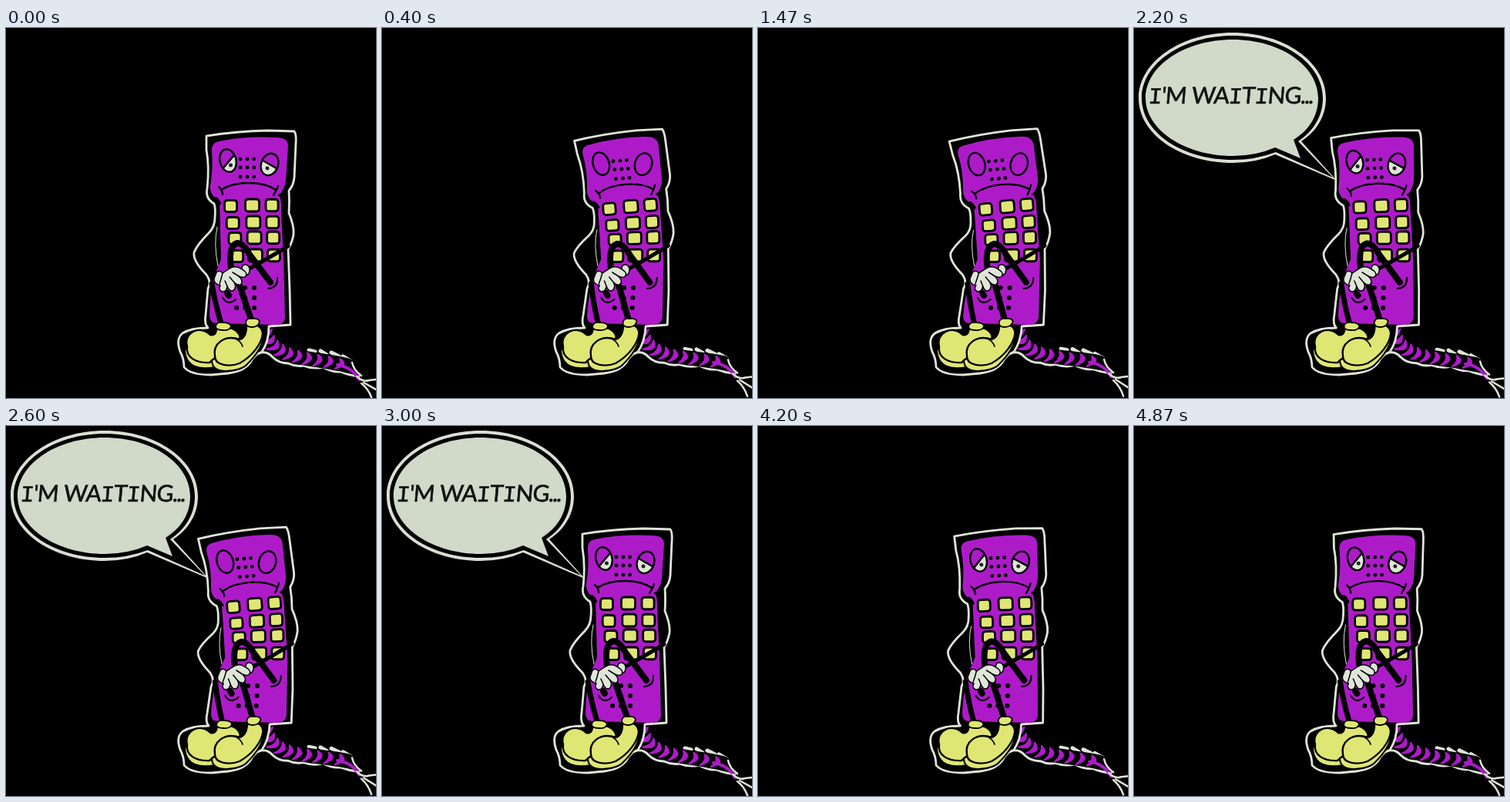
These frames come from a looping animation (480 by 480 pixels, 4.94 s). An HTML page:

```html
<!DOCTYPE html>
<html lang="en">
<head>
<meta charset="utf-8">
<title>I'm waiting</title>
<style>
  html, body { margin: 0; width: 100%; height: 100%; overflow: hidden; background: #000; }
  svg { display: block; width: 100%; height: 100%; }
  path { stroke-linecap: round; stroke-linejoin: round; }
  text { font: 30px Lato, sans-serif; letter-spacing: -1px; fill: #10120f; stroke: #10120f; stroke-width: .6; }
  .i { font-family: "Liberation Mono", monospace; }
  .dots { letter-spacing: -2px; }
</style>
</head>
<body>
<svg id="stage" viewBox="0 0 480 480">
  <defs>
    <clipPath id="clipL"><ellipse rx="10.5" ry="15" transform="rotate(-14)"/></clipPath>
    <clipPath id="clipR"><ellipse rx="11" ry="14.5" transform="rotate(20)"/></clipPath>
  </defs>
  <g id="bubble">
    <path fill="#d9e0d1" d="M217,147 C237,134 249,114 249,91 C249,44 195,6 128,6 C61,6 6,44 6,91 C6,138 61,175 128,175 Q158,175 183,164 L263,198 Z"/>
    <path fill="#000" d="M213,147 C234,133 245,113 245,91 C245,46 193,10 128,10 C63,10 10,46 10,91 C10,136 63,171 128,171 Q158,171 184,161 L258,194 Z"/>
    <path fill="#d1d9c9" d="M207,145 C228,132 239,113 239,91 C239,49 190,15 128,15 C66,15 15,49 15,91 C15,132 66,166 128,166 Q158,166 183,155 L216,169 Z"/>
    <g transform="translate(0 98) skewX(-5)">
      <text x="18"><tspan class="i">I</tspan>'M</text>
      <text x="74">WA<tspan class="i">I</tspan>T<tspan class="i">I</tspan>NG<tspan class="dots">...</tspan></text>
    </g>
  </g>
  <g id="phone"></g>
</svg>
<script>
const LOOP = 4940, SWAY = LOOP / 5;
const BUBBLE_ON = 1530, BUBBLE_OFF = 4000;
const PURPLE = '#ad1bc9', YELLOW = '#dfe674', WHITE = '#dfe6d8', BLACK = '#000';
const phone = document.getElementById('phone');
const bubble = document.getElementById('bubble');
const parts = [], eyes = [];

const clamp = v => Math.max(0, Math.min(1, v));
const smooth = v => { v = clamp(v); return v * v * (3 - 2 * v); };

function node(name, attrs, parent) {
  const el = document.createElementNS('http://www.w3.org/2000/svg', name);
  for (const key in attrs) el.setAttribute(key, attrs[key]);
  parent.appendChild(el);
  return el;
}

// Bends a point of the upright pose; k runs from 0 (right) to 1 (left).
function bend(x, y, k) {
  const u = clamp((402 - y) / 262);
  const dx = 22 * u - 6.6 * u * u - 27.4 * u ** 3;
  let dy = -(x - 338) * 0.092 * smooth((305 - y) / 70);
  if (y > 390 && x > 345) dy -= 4 * clamp((x - 345) / 100) * clamp((490 - y) / 30);
  return [x + k * dx, y + k * dy];
}

function shape(d, fill, stroke = 'none', width = 0) {
  parts.push({ d, el: node('path', { fill, stroke, 'stroke-width': width }, phone) });
}
const line = (d, stroke = BLACK, width = 2.5) => shape(d, 'none', stroke, width);
const dot = (x, y, r = 2.4) => line(`M${x},${y} L${x + 0.1},${y}`, BLACK, r * 2);

function key(x, y, w, h) {
  const l = x - w / 2, r = x + w / 2, t = y - h / 2, b = y + h / 2, c = 4;
  shape(`M${l + c},${t} L${r - c},${t} Q${r},${t} ${r},${t + c} L${r},${b - c} Q${r},${b} ${r - c},${b}` +
    ` L${l + c},${b} Q${l},${b} ${l},${b - c} L${l},${t + c} Q${l},${t} ${l + c},${t} Z`, YELLOW, BLACK, 2.8);
}

function cord() {
  const P = [[336, 391], [344, 432], [395, 426], [443, 438]];
  const at = (s, i) => (1 - s) ** 3 * P[0][i] + 3 * s * (1 - s) ** 2 * P[1][i] +
    3 * s * s * (1 - s) * P[2][i] + s ** 3 * P[3][i];
  line('M328,422 Q338,418 346,427 Q354,435 366,435 Q376,440 386,438 Q399,443 411,440 Q424,447 434,446 Q446,451 458,452', WHITE, 3);
  line('M393,418 L401,420 M408,419 L416,424 M422,421 L432,426 M437,426 L447,432', WHITE, 5);
  line('M336,391 C344,432 395,426 443,438', BLACK, 19);
  for (let n = 0; n < 10; n++) {
    const s = 0.03 + n * 0.1, x = at(s, 0), y = at(s, 1);
    const a = Math.atan2(at(s + .01, 1) - y, at(s + .01, 0) - x) - 0.15;
    const h = 9 - n * 0.25, c = Math.cos(a), q = Math.sin(a);
    const p = (t, v) => `${(x + c * t - q * v).toFixed(1)},${(y + q * t + c * v).toFixed(1)}`;
    shape(`M${p(0, -h)} Q${p(13, 1)} ${p(-6, h)} Q${p(3, 1)} ${p(0, -h)} Z`, PURPLE, PURPLE, 2);
  }
  line('M430,437 Q449,440 458,456', PURPLE, 4);
  line('M449,434 Q451,444 461,451 M455,452 Q463,460 471,457 L480,456 M464,460 L480,469 M461,461 Q470,468 474,479', WHITE, 2.5);
}

function eye(x, y, clip, shapeTurn, rx, ry, lidTurn, lidDrop, px, py) {
  const g = node('g', {}, phone);
  const inner = node('g', { 'clip-path': `url(#${clip})` }, g);
  node('rect', { x: -20, y: -20, width: 40, height: 40, fill: WHITE }, inner);
  node('circle', { cx: px, cy: py, r: 2.5, fill: '#222' }, inner);
  const lid = node('rect', { x: -30, y: -60, width: 60, height: 60, fill: PURPLE, stroke: BLACK, 'stroke-width': 2.5 }, inner);
  node('ellipse', { rx, ry, transform: `rotate(${shapeTurn})`, fill: 'none', stroke: BLACK, 'stroke-width': 2.4 }, g);
  eyes.push({ x, y, g, lid, lidTurn, lidDrop });
}

function build() {
  cord();

  // silhouette
  shape('M260,140 Q298,134 340,133 L374,134 Q377,138 376,150 L374,194 Q373,204 367,211 Q368,225 367,240' +
    ' Q374,257 373,268 Q371,279 366,287 L368,340 L369,385 Q356,386 341,387 Q341,407 332,420' +
    ' Q322,424 317,434 Q308,446 288,448 L266,450 Q239,450 231,440 Q231,429 226,420 Q220,403 229,396' +
    ' Q240,389 262,389 Q257,384 259,372 L262,338 Q267,330 260,320 Q242,302 244,291 Q248,281 263,266' +
    ' Q271,258 271,246 Q272,234 270,228 Q258,221 261,208 Q264,180 260,158 Z', BLACK, WHITE, 2.8);
  line('M274,258 Q269,280 275,309', WHITE, 1);

  // handset
  shape('M267,160 Q266,149 276,147 Q312,140 350,142 Q366,142 366,153 L363,198 Q361,211 354,217 Q358,223 357,238' +
    ' L360,300 L362,376 Q361,385 350,385 L274,383 Q264,383 264,373 Q264,345 271,320 L279,300' +
    ' L277,224 Q264,217 265,205 Q269,181 267,160 Z', PURPLE);
  line('M354,217 Q358,216 361,209 M272,220 Q276,222 278,228');

  for (const y of [170, 181, 193]) for (const x of [304, 313, 321.5]) dot(x, y);
  line('M279,210 Q293,201 315,201 Q337,201 350,210 M276,206 Q281,210 281,216 M353,205 Q351,211 347,217', BLACK, 2.4);

  [231, 253, 273, 296].forEach((y, r) => {
    key(291.5 + r * 2.7, y, 16, 15);
    key(319.5 + r * 1.3, y - 1, 18, 16);
    key(345 + r * 0.8, y - 1, 16, 15.5);
  });
  for (const y of [337, 350, 363]) { dot(310, y, 3); dot(322, y, 3); }
  dot(299, 363, 3);

  // limbs
  line('M267,332 Q272,360 279,383', BLACK, 7);
  line('M303,334 L318,378', BLACK, 8);
  line('M366,283 Q345,296 314,313', BLACK, 5);
  line('M292,312 Q288,282 300,279 Q308,279 316,294 L343,330', BLACK, 8);
  line('M340,338 Q353,337 352,324 M281,350 Q288,361 298,352', BLACK, 2.2);
  line('M287,344 L289,347', BLACK, 8);

  // gloves
  shape('M307,308 Q314,305 316,312 Q317,320 311,321 L304,318 Z', WHITE, BLACK, 1.5);
  shape('M273,317 Q277,313 281,318 L290,312 Q298,307 306,313 Q314,317 311,322 Q308,325 302,322' +
    ' Q309,329 304,333 Q300,334 296,330 Q300,338 294,341 Q290,342 287,335 Q286,343 280,342 Q275,339 278,334' +
    ' Q269,332 270,325 Z', WHITE, BLACK, 1.5);
  line('M281,318 Q279,326 277,332 M302,322 L294,317 M296,330 L290,323 M287,335 L284,328', BLACK, 1.5);

  // shoes
  shape('M232,416 Q232,433 245,439 Q256,443 271,440 L274,428 Z', YELLOW, BLACK, 2);
  shape('M273,389 Q273,400 265,398 C250,384 230,396 235,413 C233,427 246,435 264,434 L276,424 L304,402 Q300,385 273,389 Z',
    YELLOW, BLACK, 2.4);
  shape('M267,431 Q267,445 286,445 Q306,444 313,436 Q331,418 333,404 L325,400 Z', YELLOW, BLACK, 2);
  shape('M312,386 Q312,402 303,404 C283,397 268,410 271,426 C271,438 290,440 303,435 C319,426 332,410 333,396 Q331,382 312,386 Z',
    YELLOW, BLACK, 2.4);
  line('M295,402 Q304,405 307,413', BLACK, 1.8);
  shape('M272,387 Q273,381 281,382 Q291,382 292,387 Q290,393 281,392 Q272,392 272,387 Z', YELLOW, BLACK, 1.8);
  shape('M311,382 Q312,376 319,377 Q328,376 329,381 Q327,388 319,388 Q311,388 311,382 Z', YELLOW, BLACK, 1.8);

  eye(288, 172, 'clipL', -14, 10.5, 15, -50, 1.5, 3.5, 6);
  eye(342, 177, 'clipR', 20, 11, 14.5, 30, 0, -3, 5);
}

function draw(time) {
  const t = time % LOOP, phase = t % SWAY;
  const k = (1 - Math.cos(2 * Math.PI * (phase - 20) / SWAY)) / 2;
  const shut = smooth((phase - 300) / 130) * (1 - smooth((phase - 690) / 120));

  for (const { d, el } of parts) {
    el.setAttribute('d', d.replace(/([\d.]+),([\d.]+)/g,
      (_, x, y) => bend(+x, +y, k).map(v => v.toFixed(2)).join(',')));
  }
  for (const { x, y, g, lid, lidTurn, lidDrop } of eyes) {
    const [ex, ey] = bend(x, y, k);
    g.setAttribute('transform', `translate(${ex} ${ey}) rotate(${-4 * k})`);
    lid.setAttribute('transform', `rotate(${lidTurn}) translate(0 ${lidDrop + shut * 20})`);
  }
  bubble.style.display = t >= BUBBLE_ON && t < BUBBLE_OFF ? '' : 'none';
}

build();
const start = performance.now();
function tick() {
  draw(performance.now() - start);
  requestAnimationFrame(tick);
}
tick();
</script>
</body>
</html>
```
